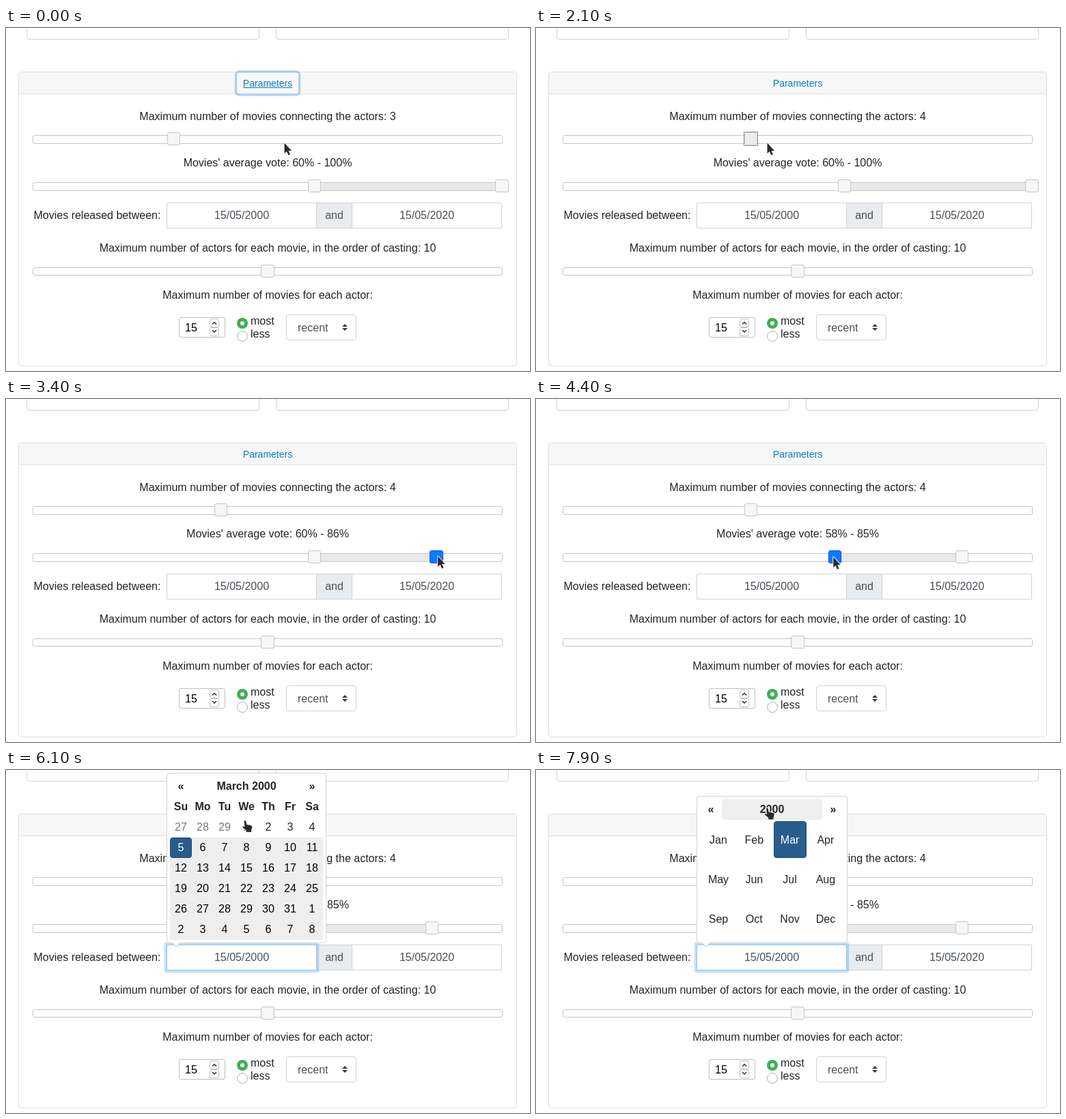
An HTML page with a canvas that plays this animation: 767x503 px, repeating every 8 s.

```html
<!DOCTYPE html>
<html lang="en">
<head>
<meta charset="utf-8">
<title>Search parameters</title>
<style>
html, body { margin: 0; width: 100%; height: 100%; overflow: hidden; background: #fff; }
canvas { display: block; }
</style>
</head>
<body>
<canvas id="stage" width="767" height="503"></canvas>
<script>
const c = document.getElementById('stage').getContext('2d');
const LOOP = 8000, STEP = 100;
const INK = '#212529', GREY = '#495057', LINE = '#ced4da', CARD = '#dfdfdf', EDGE = '#c5c5c5', LINK = '#0b7bc1';

// Pointer moves: start, end, then the place reached
const MOVES = [
  [0, 300, 433, 221], [300, 700, 249, 179], [800, 900, 247, 168], [1200, 1900, 338, 168],
  [2200, 2700, 650, 249], [2700, 3000, 724, 231], [3200, 3470, 625, 230], [3600, 3800, 449, 231],
  [4300, 5100, 388, 232], [5100, 5500, 397, 285], [5900, 6300, 335, 3], [6400, 7100, 314, 24],
  [7200, 7600, 339, 55]
];

function pointerAt(t) {
  let x = 407, y = 168;
  for (const [from, to, toX, toY] of MOVES) {
    const left = 1 - Math.min(1, Math.max(0, (t - from) / (to - from)));
    const k = 1 - left * left;
    x += (toX - x) * k;
    y += (toY - y) * k;
  }
  return { x, y };
}

const xOf = percent => 40 + 6.86 * percent;
const percentAt = t => Math.round((pointerAt(t).x - 40) / 6.86);

function text(s, x, y, color = INK, align = 'center', style = '16px') {
  c.font = style + ' "Liberation Sans", Arial, sans-serif';
  c.textAlign = align;
  c.fillStyle = color;
  c.fillText(s, x, y);
}

function box(x, y, w, h, fill, line, r = 0) {
  const o = line ? .5 : 0;
  c.beginPath();
  c.roundRect(x + o, y + o, w - 2 * o, h - 2 * o, Math.max(0, r - o));
  if (fill) { c.fillStyle = fill; c.fill(); }
  if (line) { c.strokeStyle = line; c.lineWidth = 1; c.stroke(); }
}

function halo(x, y, w, h, alpha, r) {
  c.beginPath();
  c.roundRect(x - 1.6, y - 1.6, w + 3.2, h + 3.2, r);
  c.strokeStyle = `rgba(30,140,230,${alpha})`;
  c.lineWidth = 3.2;
  c.stroke();
}

function triangle(x, y, w, h, fill) {
  c.beginPath();
  c.moveTo(x - w, y);
  c.lineTo(x + w, y);
  c.lineTo(x, y + h);
  c.fillStyle = fill;
  c.fill();
}

function chevron(x, y, d) {
  c.beginPath();
  c.moveTo(x - 3, y);
  c.lineTo(x, y + d);
  c.lineTo(x + 3, y);
  c.strokeStyle = '#222';
  c.lineWidth = 1.4;
  c.stroke();
}

function circle(x, y, r, fill, line) {
  c.beginPath();
  c.arc(x, y, r, 0, 7);
  c.fillStyle = fill;
  c.fill();
  if (line) { c.strokeStyle = line; c.lineWidth = 1; c.stroke(); }
}

function handle(percent, y, p, active, focus) {
  const cx = xOf(percent), x = Math.round(cx - 9.6), w = Math.round(cx + 9.6) - x;
  const lit = focus || (p.x >= x && p.x < x + w && p.y >= y && p.y < y + 19);
  if (active) box(x, y, w, 19, '#007fff', '#003eff', 3);
  else box(x, y, w, 19, lit ? '#ededed' : '#f6f6f6', lit ? '#ccc' : EDGE, 3);
  if (focus) {
    c.setLineDash([1, 1]);
    box(x - 1, y - 1, w + 2, 21, null, INK);
    c.setLineDash([]);
  }
}

const track = (y, h = 13) => box(39, y, 688, h, '#fff', EDGE, 3);

function form(t, p) {
  const during = (a, b) => t >= a && t < b;
  const count = t >= 1200 && pointerAt(Math.min(t, 2100)).x > 280 ? 4 : 3;
  const high = t < 3200 ? 100 : percentAt(Math.min(t, 3500));
  const low = t < 4300 ? 60 : percentAt(Math.min(t, 5100));

  box(30, -22, 341, 39, '#fff', LINE, 4);
  box(395, -22, 341, 39, '#fff', LINE, 4);
  box(18, 64, 730, 432, '#fff', CARD, 4);
  box(19, 65, 728, 31, '#f7f7f7', null, 3);
  box(19, 96, 728, 1, CARD);
  if (t < 1000) {
    halo(338, 65.5, 90, 31, .36, 5);
    box(347, 87, 72, 1, LINK);
  }
  text('Parameters', 383, 86, LINK, 'center', '14px');

  text('Maximum number of movies connecting the actors: ' + count, 383, 135);
  track(157);
  handle(10 * count, 153, p, during(1000, 2100), during(2100, 3200));

  text(`Movies' average vote: ${low}% - ${high}%`, 383, 203);
  track(226);
  box(xOf(low), 226, xOf(high) - xOf(low), 13, '#e9e9e9', EDGE);
  handle(low, 222, p, during(4200, 5000), during(5000, 5700));
  handle(high, 222, p, during(3200, 3600), during(3600, 4200));

  text('Movies released between:', 40.5, 280, INK, 'left');
  box(454, 256, 53, 38, '#e9ecef', LINE);
  box(506, 256, 220, 38, '#fff', LINE, 1);
  box(235, 256, 220, 38, '#fff', LINE, 1);
  if (t >= 5800) {
    c.globalAlpha = during(5800, 6000) || during(7000, 7200) ? .75 : 1;
    halo(235, 256, 220, 38, .27, 1);
    box(235, 256, 220, 38, null, '#8cc3ee', 1);
    c.globalAlpha = 1;
  }
  text('15/05/2000', 345, 280, GREY);
  text('and', 480.5, 280, GREY);
  text('15/05/2020', 616, 280, GREY);

  text('Maximum number of actors for each movie, in the order of casting: 10', 383, 328);
  track(351, 12);
  handle(50, 347, p);

  text('Maximum number of movies for each actor:', 383, 397);
  box(253, 424, 68, 30, '#fff', '#bfbfbf', 3);
  text('15', 262, 445, '#000', 'left');
  box(298, 426, 14, 13, '#fff', '#c0c0c0', 3);
  box(298, 439, 14, 13, '#fff', '#c0c0c0', 3);
  chevron(305, 434.5, -3);
  chevron(305, 443, 3);
  circle(346, 433, 8, '#3cb054');
  circle(346, 433, 3, '#fff');
  circle(346, 452, 7.5, '#fff', '#b0b0b0');
  text('most', 358, 435, INK, 'left');
  text('less', 358, 454, INK, 'left');
  box(410, 420, 103, 38, '#fff', LINE, 4);
  text('recent', 427, 445, GREY, 'left');
  triangle(496, 438, 4, -4, '#343a40');
  triangle(496, 440, 4, 4, '#343a40');
}

const bold = (s, x, y) => text(s, x, y, INK, 'center', 'bold 16px');
const chosen = (x, y, w, h) => box(x, y, w, h, '#285e8e', '#1f4a70', 4);

function popup(y, w, title, p) {
  const head = w - 74;
  box(235, y, w, 254 - y, '#fff', '#d4d4d4', 4);
  triangle(249, 253, 7, 7, '#d4d4d4');
  triangle(249, 252, 6, 6.5, '#fff');
  if (p.x >= 272 && p.x < 272 + head && p.y >= y + 4 && p.y < y + 34) box(272, y + 5, head, 30, '#eee', null, 4);
  bold('«', 256, y + 25);
  bold(title, 272 + head / 2, y + 25);
  bold('»', 214 + w, y + 25);
}

function days(p) {
  popup(4, 234, 'March 2000', p);
  'Su Mo Tu We Th Fr Sa'.split(' ').forEach((d, i) => bold(d, 256 + 32 * i, 59));
  box(240, 99, 224, 150, '#eee');
  chosen(240, 99, 32, 30);
  for (let i = 0; i < 42; i++) {
    const color = i < 3 ? '#777' : i === 7 ? '#fff' : i < 7 ? INK : '#000';
    text(new Date(2000, 1, 27 + i).getDate(), 256 + 32 * (i % 7), 89 + 30 * Math.floor(i / 7), color);
  }
}

function months(p) {
  popup(38, 221, '2000', p);
  chosen(348, 75, 48, 54);
  'Jan Feb Mar Apr May Jun Jul Aug Sep Oct Nov Dec'.split(' ').forEach((m, i) =>
    text(m, 267 + 52.3 * (i % 4), 108 + 58 * Math.floor(i / 4), i === 2 ? '#fff' : INK));
}

const ARROW = new Path2D('M0 0V15.5L3.4 12.4 5.8 18 8.4 16.9 6 11.4H10.5Z');
const HAND = new Path2D('M2 1.5Q2 0 3.3 0T4.8 1.5L5.6 6 12 7.3Q14 8 13.8 10L12.6 14V17H5.2V14.5L.2 10.5Q-1 9 .6 8.4L3 9.5Z');
const BEAM = new Path2D('M-2.5 -7H-.5L.5 -6 1.5 -7H3.5M.5 -6V6M-2.5 7H-.5L.5 6 1.5 7H3.5');

function pointer(t, { x, y }) {
  const beam = x > 235 && x < 455 && y > 256 && y < 294;
  const hand = !beam && t >= 5800 && y > 3;
  const shape = beam ? BEAM : hand ? HAND : ARROW;
  c.save();
  c.translate(x + (beam ? 0 : hand ? -4 : .5), y + .5);
  c.lineJoin = 'round';
  c.strokeStyle = '#fff';
  c.lineWidth = beam ? 2.6 : 1.8;
  c.stroke(shape);
  c.fillStyle = c.strokeStyle = '#2b2b2b';
  c.lineWidth = 1.2;
  if (beam) c.stroke(shape);
  else c.fill(shape);
  c.restore();
}

function draw(t) {
  const p = pointerAt(t);
  c.fillStyle = '#fff';
  c.fillRect(0, 0, 767, 503);
  form(t, p);
  if (t >= 7200) months(p);
  else if (t >= 5800) days(p);
  pointer(t, p);
}

let start;
function tick(now) {
  start ??= now;
  draw(Math.floor((now - start) % LOOP / STEP) * STEP);
  requestAnimationFrame(tick);
}
draw(0);
requestAnimationFrame(tick);
</script>
</body>
</html>
```
